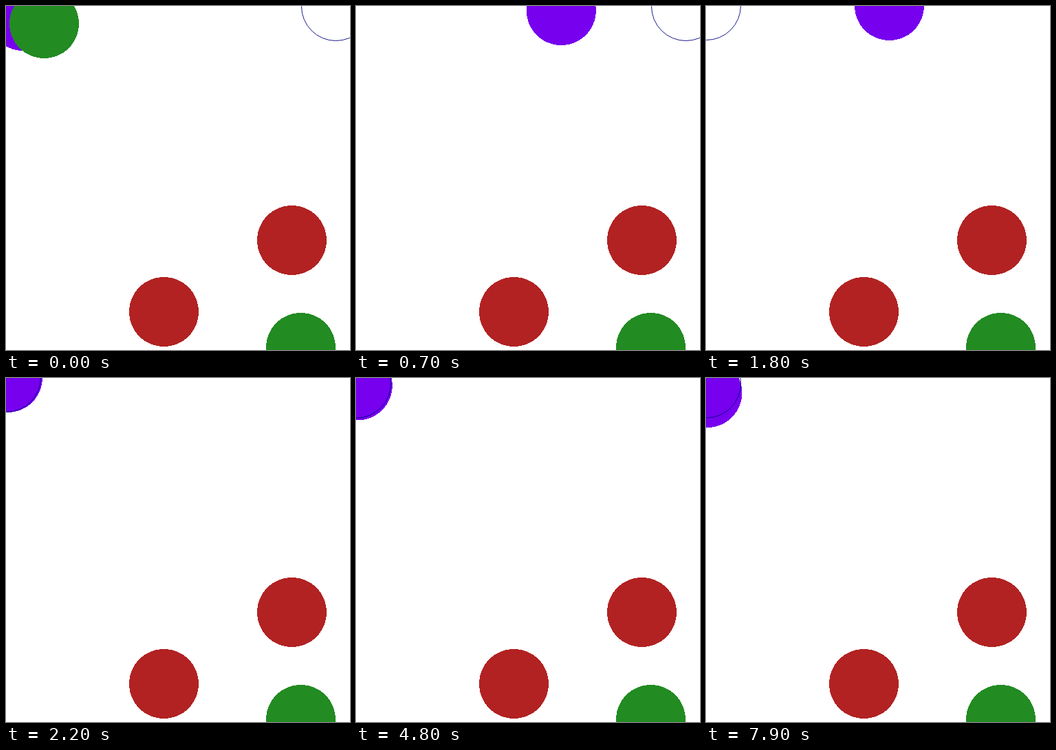
Animation, 500 px wide and 500 px high, one loop 8 s. Source, as an HTML page:

```html
<!DOCTYPE html>
<html lang="en">
<head>
<meta charset="utf-8">
<title>Seeking circle</title>
<style>
  html, body { margin: 0; width: 100%; height: 100%; overflow: hidden; background: #fff; }
  svg { display: block; width: 100vw; height: 100vh; }
</style>
</head>
<body>
<svg viewBox="0 0 500 500" shape-rendering="crispEdges">
  <g fill="#b22222">
    <circle cx="415.5" cy="340.5" r="50.5"/>
    <circle cx="229.5" cy="444.5" r="50.5"/>
  </g>
  <circle cx="428.5" cy="496.5" r="50.5" fill="#228b22"/>
  <circle id="seeker" r="50.5" fill="#7700ee"/>
  <circle id="food" cx="55.5" cy="25.5" r="50.5" fill="#228b22"/>
  <circle id="goal" r="50" fill="none" stroke="#000080" stroke-width="0.9" shape-rendering="geometricPrecision"/>
</svg>
<script>
const LOOP = 8000, STEP = 100;
const TURN = 12, ARRIVE = 22; // steps at the right wall and at the corner
const CORNER = [0.5, -0.5];
const seeker = document.getElementById('seeker');
const food = document.getElementById('food');
const goal = document.getElementById('goal');

// Distance covered by a speed that grows by 10 each step up to a limit
function travelled(steps, start, limit) {
  let sum = 0;
  for (let i = 1; i <= steps; i++) sum += Math.min(start + 10 * i, limit);
  return sum;
}

// Small hops off the top wall whose height swells and fades
function hop(n) {
  const height = 14.5 + 6.5 * Math.cos(2 * Math.PI * (n - 41) / 38);
  const phase = 10.5 * Math.PI * (n - ARRIVE) / 57;
  return [1.5 - Math.sin(n), 0.5 + height * Math.abs(Math.sin(phase))];
}

function seekerAt(n) {
  if (n > ARRIVE) return hop(n);
  if (n > TURN) return [Math.max(500.5 - travelled(n - TURN, 4, 66), CORNER[0]), CORNER[1]];
  const run = travelled(n, 0, 63.3);
  return [Math.min(25 + run, 500.5), Math.max(14.5 - run * 0.029, CORNER[1])];
}

function goalAt(n) {
  if (n < TURN - 1) return [479.5, 0.5];
  return n <= ARRIVE ? CORNER : [0.7, 5 + 3 * Math.cos(0.413 * (n - 48))];
}

function place(circle, [x, y]) {
  circle.setAttribute('cx', x);
  circle.setAttribute('cy', y);
}

function draw(time) {
  const n = Math.floor((time % LOOP) / STEP);
  place(seeker, seekerAt(n));
  place(goal, goalAt(n));
  food.setAttribute('visibility', n < 1 ? 'visible' : 'hidden');
}

let origin;
function tick(now) {
  origin ??= now;
  draw(now - origin);
  requestAnimationFrame(tick);
}
draw(0);
requestAnimationFrame(tick);
</script>
</body>
</html>
```
